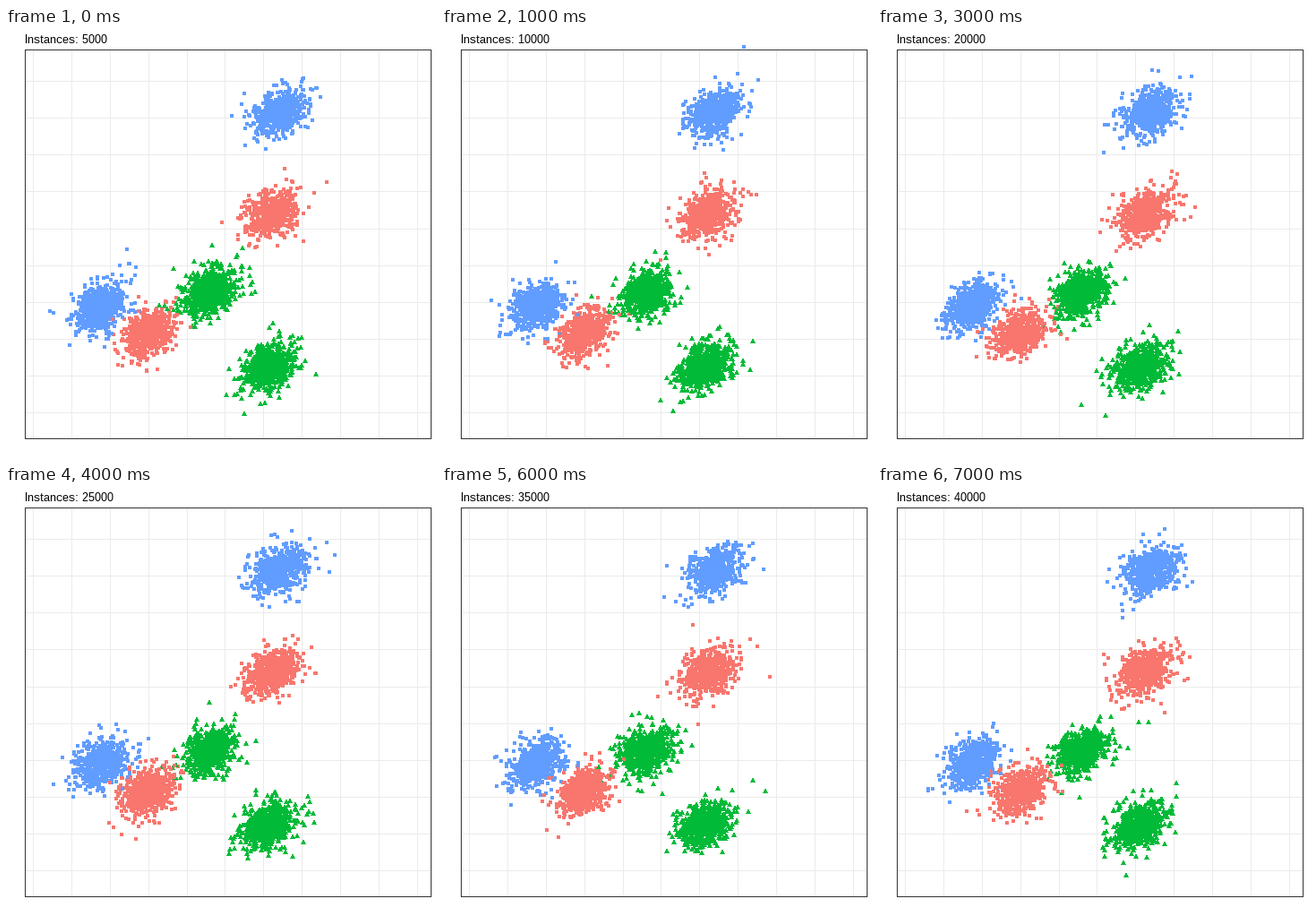
Animation of 480x480 px, one loop 8 s. Source, as a matplotlib script:

```python
import matplotlib.pyplot as plt
import numpy as np
from matplotlib.animation import FuncAnimation
from matplotlib.collections import PathCollection
from matplotlib.patches import Rectangle
from matplotlib.path import Path
from matplotlib.transforms import IdentityTransform

plt.rcParams["text.hinting"] = "native"
plt.rcParams["text.hinting_factor"] = 1

SIZE = 480
BATCHES, STEP = 8, 5000
POINTS = 650
TAIL = 14  # degrees of freedom: lower gives more far points

BLUE, RED, GREEN = "#619CFF", "#F8766D", "#00BA38"
SQUARE = Path([(-2, -2), (2, -2), (2, 2), (-2, 2), (-2, -2)])
DOT = Path([(-1, -2), (1, -2), (2, -1), (2, 1), (1, 2), (-1, 2), (-2, 1),
            (-2, -1), (-1, -2)])
TRIANGLE = Path([(-2.5, -2), (2.5, -2), (0, 2.4), (-2.5, -2)])

# centre, colour and marker of each cluster
CLUSTERS = [
    ((305, 94), BLUE, SQUARE),
    ((106, 310), BLUE, SQUARE),
    ((297, 208), RED, DOT),
    ((158, 341), RED, DOT),
    ((228, 296), GREEN, TRIANGLE),
    ((293, 379), GREEN, TRIANGLE),
]
CENTRES, COLOURS, MARKERS = zip(*CLUSTERS)
SPREAD = np.array([[13.2, 0], [-3.6, 11.4]])


def batch(k):
    """Fresh points around every centre, cluster by cluster in turn."""
    rng = np.random.default_rng(40 + k)
    shape = (POINTS, len(CLUSTERS))
    z = rng.standard_normal(shape + (2,))
    z /= np.sqrt(rng.chisquare(TAIL, shape + (1,)) / TAIL)
    return np.round(np.array(CENTRES) + z @ SPREAD.T).reshape(-1, 2)


fig = plt.figure(figsize=(SIZE / 72, SIZE / 72), dpi=72, facecolor="white")
ax = fig.add_axes([0, 0, 1, 1])
ax.set(xlim=(0, SIZE), ylim=(SIZE, 0))
ax.axis("off")

crisp = dict(linewidth=1, antialiased=False, snap=False)
grid = dict(colors="#EBEBEB", zorder=1, **crisp)
ax.vlines(np.round(30 + 42.9 * np.arange(11)) + 0.5, 24, 459, **grid)
ax.hlines(np.round(59 + 41.15 * np.arange(10)) + 0.5, 21, 475, **grid)
ax.add_patch(Rectangle((21.5, 24.5), 453, 434, fill=False, ec="#333333",
                       zorder=3, **crisp))

# markers and colours cycle through the clusters, so they interleave
cloud = PathCollection(MARKERS, sizes=[1], facecolors=COLOURS,
                       edgecolors="none", linewidths=0, antialiaseds=False,
                       offsets=batch(0), offset_transform=ax.transData,
                       transform=IdentityTransform(), zorder=2)
ax.add_collection(cloud, autolim=False)
title = ax.text(21, 17, "", family="Liberation Sans", size=13, color="black",
                va="baseline")


def draw(k):
    cloud.set_offsets(batch(k))
    title.set_text(f"Instances: {STEP * (k + 1)}")
    return cloud, title


anim = FuncAnimation(fig, draw, frames=BATCHES, interval=1000, repeat=True,
                     repeat_delay=0)
plt.show()
```
